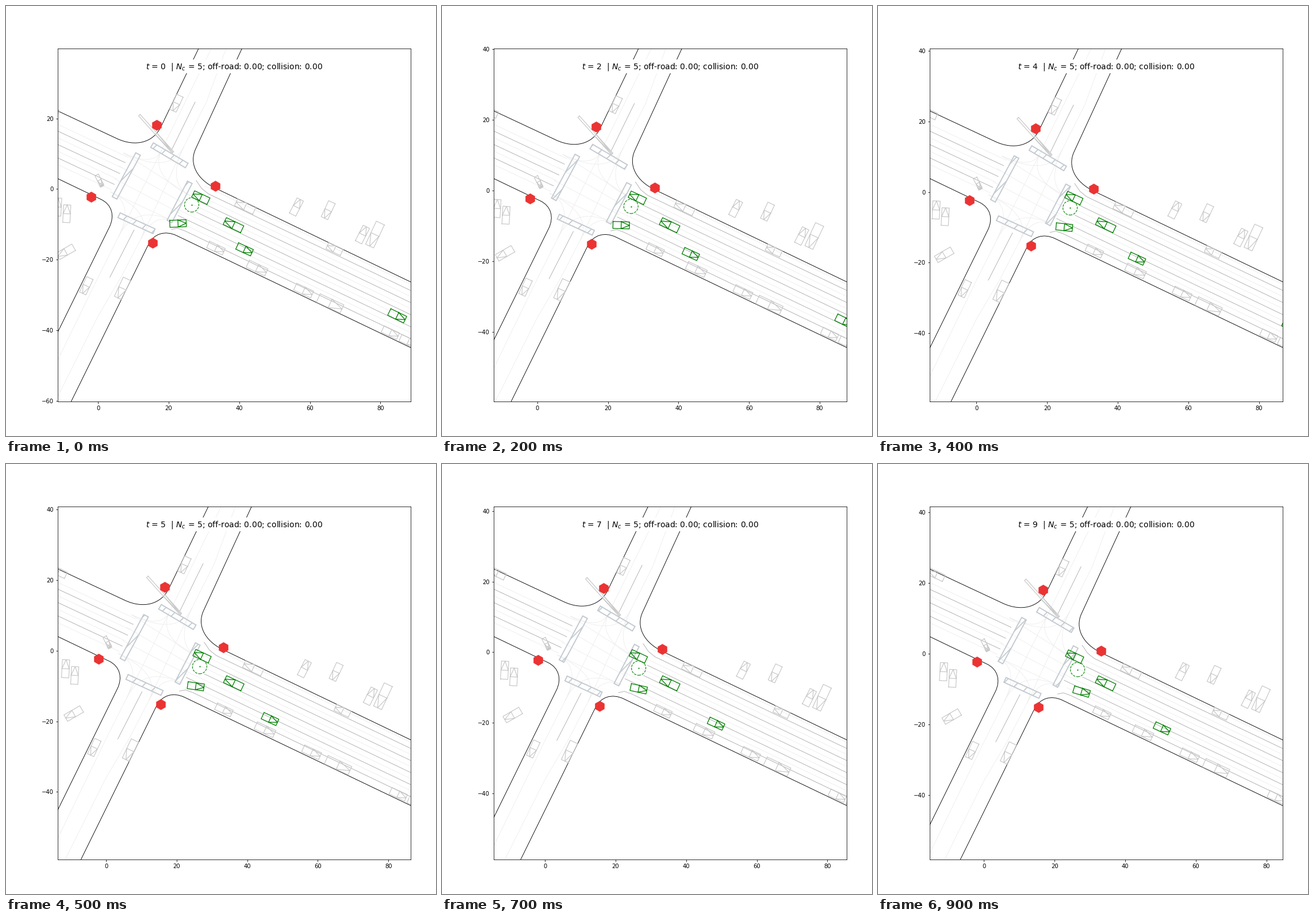
Animation, 748 px wide and 748 px high, one loop 1 s. Source, as a matplotlib script:

```python
import numpy as np
import matplotlib.pyplot as plt
from matplotlib.animation import FuncAnimation
from matplotlib.patches import Circle, PathPatch, Polygon, Rectangle
from matplotlib.path import Path

SIZE, DPI, FRAMES = 748, 72, 10
SPAN = 100  # visible width in metres
SLOPE = -0.478  # fall of the main road
FAINT, LANE, PARKED, CROSSWALK = "#ececec", "#a4a4a4", "#c8c8c8", "#c3cad0"

plt.rcParams["font.family"] = "DejaVu Sans"
plt.rcParams["hatch.linewidth"] = 1.7
fig = plt.figure(figsize=(SIZE / DPI, SIZE / DPI), dpi=DPI, facecolor="white")
ax = fig.add_axes([89.86 / SIZE, 59.9 / SIZE, 614 / SIZE, 614 / SIZE])
ax.set_autoscale_on(False)


def polyline(points, color):
    ax.plot(*zip(*points), color=color, lw=0.8, zorder=1)


def curve(points, codes, color, lw):
    ax.add_patch(PathPatch(Path(points, codes), fc="none", ec=color, lw=lw, zorder=1))


def meeting_point(p, u, q, v):
    """Where the line through p along u crosses the line through q along v."""
    s = np.linalg.solve(np.column_stack([u, v]), q - p)[0]
    return p + s * u


def kerb(*points):
    """Two straight borders joined by a rounded corner."""
    start, a, b, end = np.array(points)
    corner = meeting_point(a, a - start, b, b - end)
    c1, c2 = a + 0.6 * (corner - a), b + 0.6 * (corner - b)
    codes = [Path.MOVETO, Path.LINETO] + 3 * [Path.CURVE4] + [Path.LINETO]
    curve([start, a, c1, c2, b, end], codes, "black", 0.9)


def turn(p, q):
    """Faint path from the main road at p to the side street at q."""
    bend = meeting_point(p, np.array([1, SLOPE]), q, np.array([1, 2.05]))
    curve([p, bend, q], [Path.MOVETO, Path.CURVE3, Path.CURVE3], FAINT, 0.8)


def rotate(x, y, heading, px, py):
    c, s = np.cos(np.radians(heading)), np.sin(np.radians(heading))
    return x + c * px - s * py, y + s * px + c * py


def box_outline(x, y, heading, length, width=None):
    """Rectangle plus a triangle pointing at the front."""
    a, b = length / 2, (width or 1 + 0.21 * length) / 2
    nan = np.nan
    px = np.array([-a, -a, a, a, -a, nan, 0, a, 0, 0])
    py = np.array([b, -b, -b, b, b, nan, b, 0, -b, b])
    return rotate(x, y, heading, px, py)


def park(*spec):
    ax.plot(*box_outline(*spec), color=PARKED, lw=1.2, zorder=2.5)


# Road borders
kerb((-18, 25.2), (5.3, 14.3), (17.85, 17.7), (30.4, 43.8))
kerb((42.6, 43.8), (27.63, 11.35), (33.2, 0.26), (91, -27.5))
kerb((-18, 6.1), (0.86, -2.95), (3.2, -10.8), (-18, -53.9))
kerb((-9, -63), (14.27, -15.7), (22.25, -13.2), (91, -46.1))


# Lanes of the main road, evenly spaced on either side of the junction
def west_lane(k, color):
    x = 7.7 - 1.55 * k
    y = lambda at: 16.45 - 3.8 * k + 0.98 * SLOPE * (at + 11.5)
    polyline([(-18, y(-18)), (x, y(x))], color)


def east_lane(k, x, color, lead_in=()):
    y = lambda at: -28.7 - 3.42 * k + SLOPE * (at - 88.45)
    polyline([*lead_in, (x, y(x)), (91, y(91))], color)


EAST_STARTS = [31.2, 29, 27.9, 22.7, 24.6]
LEAD_INS = {0: [(27.8, 2.4), (29.3, 0.2)], 4: [(20.8, -11.45), (22.5, -11.1)]}
for k in range(4):
    west_lane(k - 0.5, FAINT)
for k in range(3):
    west_lane(k, LANE)
for k, x in enumerate(EAST_STARTS):
    east_lane(k - 0.5, x - 1, FAINT)
    east_lane(k, x, LANE, LEAD_INS.get(k, ()))

# Lanes of the side street
NORTH = np.array([(18, 11), (24.3, 12)])
SOUTH = np.array([(5.8, -13.5), (12.2, -14)])
polyline([(27.5, 24.65), (20.95, 11.3)], LANE)
polyline([(10.2, -11.6), (3.34, -25)], LANE)
polyline([NORTH[0], (34, 43.7)], FAINT)
polyline([NORTH[1], (30.7, 24.7), (37.7, 43.7)], FAINT)
polyline([SOUTH[0], (0, -25), (-18, -62)], FAINT)
polyline([SOUTH[1], (6.5, -25), (0, -36), (-13, -62)], FAINT)

# Paths through the junction
WEST = np.linspace((7.2, 10.2), (3.5, -0.8), 4)
EAST = np.linspace((26.5, -2.1), (21.5, -9.2), 4)
for p, q in [*zip(WEST, EAST), *zip(NORTH, SOUTH)]:
    polyline([p, q], FAINT)
for side in (WEST, EAST):
    for q in NORTH:
        turn(side[0], q)
    for q in SOUTH:
        turn(side[-1], q)

# Crosswalks: centre, heading, length
for x, y, heading, length in [(20.2, 9.55, -30.5, 11.4), (8, 3.7, 61.8, 14.1),
                              (10.9, -9.7, -24.6, 10.9), (23.1, -3.65, 62.5, 12.5)]:
    px, py = length / 2 * np.array([-1, 1, 1, -1]), 0.74 * np.array([-1, -1, 1, 1])
    corners = np.column_stack(rotate(x, y, heading, px, py))
    ax.add_patch(Polygon(corners, fc="none", ec=CROSSWALK, lw=1.9, hatch="/", zorder=2))

# Cars along the south kerb: place on the road, length
for x, length in [(33.4, 4.9), (45.05, 5.8), (58.25, 5.3), (65.75, 7.4), (82.8, 4.8), (87.9, 4.9)]:
    park(x, -16.75 - 0.4845 * (x - 33.4), -25, length)

# Other parked cars by heading
PARKED_CARS = {
    245: [(22.2, 24.3, 4.7), (-3.35, -27.4, 4.8), (6.9, -28.15, 6), (65.2, -6, 5), (78.45, -12.9, 7.2)],
    63: [(56.2, -5.1, 4.8), (74.9, -12.9, 4.9)],
    87: [(-8.87, -7, 5), (-11.45, -5.1, 5.1)],
    155: [(41.7, -4.92, 5.7), (67, -17, 4.5), (-13.5, 22.35, 4.7)],
    210: [(-9.16, -17.8, 5.2)],
}
for heading, cars in PARKED_CARS.items():
    for x, y, length in cars:
        park(x, y, heading, length)

# Bike and long barrier
park(0.35, 2.5, -63, 3.3, 1.1)
park(0.95, 1.15, -63, 0.9, 1.1)
park(16.45, 15.65, -48, 14.2, 0.6)

# Stop signs
ax.plot([16.65, 33.2, -2.05, 15.4], [18.07, 0.87, -2.3, -15.18], "h", color="#eb3333",
        ms=18, mew=0.8, zorder=4)

# Walker with its dashed safety circle
ax.add_patch(Circle((26.52, -4.5), 2.03, fc="none", ec="green", lw=1.1, ls="--", zorder=3))
ax.plot([26.52], [-4.5], "o", color="green", ms=2.2, mew=0, zorder=3)

# Cars driving straight: start, heading, speed per frame, length
CARS = [
    (29.1, -2.43, 155, 0.42, 4.8),
    (38.36, -10.24, 154.7, 0.48, 5.45),
    (41.5, -17.1, -24.5, 1.09, 4.6),
    (84.74, -35.93, -26, 1.22, 5.0),
]
car_lines = [ax.plot([], [], color="green", lw=1.3, zorder=3)[0] for _ in range(len(CARS) + 1)]

ax.add_patch(Rectangle((0.244, 0.930), 0.512, 0.040, transform=ax.transAxes,
                       fc="white", ec="none", zorder=5))
title = ax.text(0.5, 0.943, "", transform=ax.transAxes, ha="center", va="baseline",
                fontsize=13.9, zorder=6)


def straight_car(t, x, y, heading, speed, length):
    angle = np.radians(heading)
    return box_outline(x + speed * t * np.cos(angle), y + speed * t * np.sin(angle), heading, length)


def turning_car(t):
    return box_outline(22.65 + 0.555 * t, -9.78 - 0.012 * t**2, 2.5 - 2.1 * t, 4.65)


def update(t):
    left = -11.45 - 0.4674 * t + 0.0033 * t**2
    top = 39.78 + 0.21 * t
    ax.set_xlim(left, left + SPAN)
    ax.set_ylim(top - SPAN, top)
    for line, car in zip(car_lines, CARS):
        line.set_data(*straight_car(t, *car))
    car_lines[-1].set_data(*turning_car(t))
    title.set_text(f"$t$ = {t}  | $N_c$ = 5; off-road: 0.00; collision: 0.00")
    return [*car_lines, title]


anim = FuncAnimation(fig, update, frames=FRAMES, interval=100, repeat=True, repeat_delay=0)
plt.show()
```
